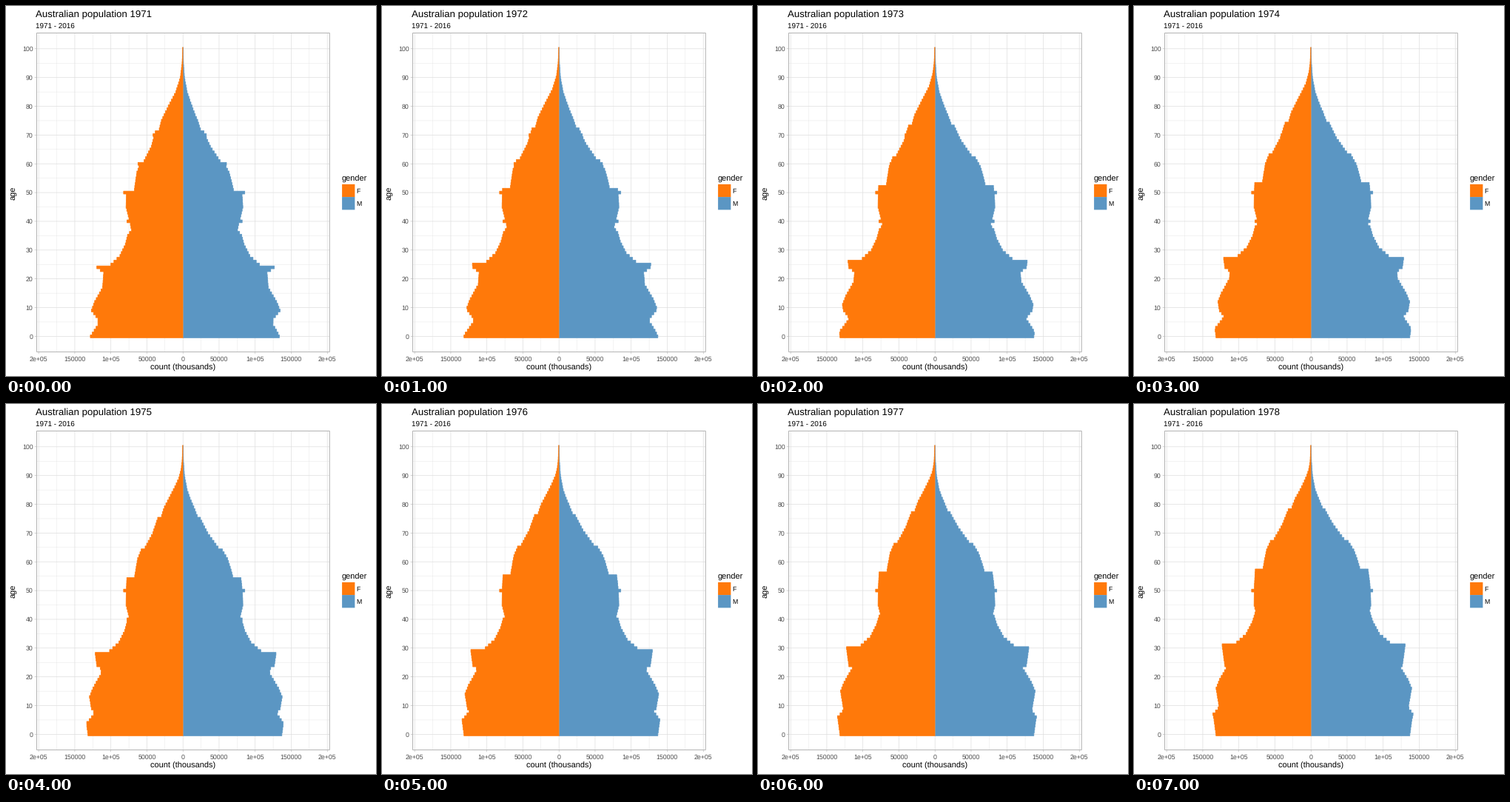
Write a matplotlib script that moves like this. It is 500 px wide and 500 px high and loops after 8 s.

```python
import matplotlib.pyplot as plt
import numpy as np
from matplotlib.animation import FuncAnimation
from matplotlib.patches import Rectangle

plt.rcParams["text.hinting"] = "none"

SIZE, DPI = 500, 100
PX = 72 / DPI                      # points per pixel
X0, PER_K = 239.2, 0.975           # zero line, pixels per thousand people
Y0, PER_AGE = 446.4, 3.886         # age zero, pixels per year of age
LEFT, RIGHT, TOP, BOTTOM = 41.5, 437.3, 36.5, 467.4
ORANGE, BLUE = "#ff790a", "#5b96c3"
GREY, GRID, BORDER = "#4d4d4d", "#dedede", "#b3b3b3"
FIRST_YEAR, YEARS = 1971, 8

AGES = np.arange(101)
BIRTHS = 131.8                     # girls born per year, in thousands

# Turning points of the female age curve: age, thousands
CURVE = [(0, 128.5), (4, 118), (6, 118), (9, 127), (12, 122.5), (17, 111.5),
         (22, 110), (24, 119.5), (25, 100), (28, 87.5), (32, 80), (35, 77),
         (37, 71.5), (39, 73), (45, 79), (50, 78.5), (51, 67.5), (57, 64),
         (60, 59.5), (61, 54), (66, 44), (71, 38.5), (72, 33), (75, 30),
         (80, 20.5), (85, 10), (90, 3.7), (95, 1.3), (100, 0.4)]


def sigmoid(age, middle, width):
    return 1 / (1 + np.exp((middle - age) / width))


def yearly_growth(mortality):
    """Immigration fades after 35, mortality rises exponentially."""
    arrivals = 0.007 * np.exp(-AGES / 3) + 0.005 * sigmoid(-AGES, -36, 4)
    deaths = mortality * np.exp(0.12 * (AGES - 75))
    return 1 + arrivals - np.minimum(deaths, 0.5)


def envelopes(pop, births, mortality):
    """Age every cohort year by year and keep the widest bar seen so far."""
    growth = yearly_growth(mortality)
    rounded = (AGES % 10 == 0) & (AGES >= 40) & (AGES <= 70)
    widest = pop * np.where(rounded, 1.05, 1)   # ages reported as round numbers
    result = [widest]
    for year in range(1, YEARS):
        pop = np.append(0, (pop * growth)[:-1])
        pop[:year] = births * (1 + 0.004 * AGES[:year])
        widest = np.maximum(widest, pop)
        result.append(widest)
    return result


female = np.interp(AGES, *zip(*CURVE))
sex_ratio = 1.06 - 0.02 * np.exp(-AGES / 2) - 0.52 * sigmoid(AGES, 69, 6)
women = envelopes(female, BIRTHS, 0.03)
men = envelopes(female * sex_ratio, BIRTHS * sex_ratio[0], 0.06)

fig = plt.figure(figsize=(SIZE / DPI, SIZE / DPI), dpi=DPI, facecolor="white")
ax = fig.add_axes([0, 0, 1, 1])
ax.set(xlim=(0, SIZE), ylim=(SIZE, 0))
ax.axis("off")


def line(x, y, color, width):
    ax.plot(x, y, color=color, lw=width * PX, zorder=1,
            solid_capstyle="butt", snap=False)


def label(x, y, text, size, color="black", **kw):
    return ax.text(x, y, text, fontsize=size * PX, color=color,
                   family="Liberation Sans", **kw)


def box(x, y, w, h, **kw):
    ax.add_patch(Rectangle((x, y), w, h, snap=False, **kw))


def x_of(thousands):
    return X0 + thousands * PER_K


def y_of(age):
    return Y0 - age * PER_AGE


def count_text(k):
    if k == 0:
        return "0"
    return f"{k // 100}e+05" if k % 100 == 0 else f"{k}000"


# Grid, ticks and tick labels
for k in range(-200, 201, 25):
    x, major = x_of(k), k % 50 == 0
    line([x, x], [TOP, BOTTOM], GRID, 0.7 if major else 0.35)
    if major:
        line([x, x], [BOTTOM, BOTTOM + 2.8], BORDER, 0.6)
        label(x, 479.5, count_text(abs(k)), 8.8, GREY, ha="center")
for age in range(0, 101, 5):
    y, major = y_of(age), age % 10 == 0
    line([LEFT, RIGHT], [y, y], GRID, 0.7 if major else 0.35)
    if major:
        line([LEFT - 2.8, LEFT], [y, y], BORDER, 0.6)
        label(36.5, y + 3.3, str(age), 8.8, GREY, ha="right")
box(LEFT, TOP, RIGHT - LEFT, BOTTOM - TOP, fill=False, ec=BORDER, lw=PX,
    zorder=4)

# Titles and legend
title = label(40.5, 15, "", 13.2)
label(40.5, 31, "1971 - 2016", 9.9)
label(X0, 492, "count (thousands)", 11, ha="center")
label(10.5, 252.4, "age", 11, ha="center", va="center", rotation=90)
label(453.9, 237, "gender", 11)
for top, color, name in ((240.9, ORANGE, "F"), (258.1, BLUE, "M")):
    box(454.1, top, 17.3, 17.3, fc=color, lw=0)
    label(473.4, top + 11.9, name, 8.8)

# Pyramid halves as filled steps with a thin outline
edges = y_of(np.arange(102) - 0.5)
men_half, women_half = [
    ax.stairs(np.full(101, X0), edges, baseline=X0, fill=True, snap=False,
              orientation="horizontal", fc=color, ec=color, lw=0.7 * PX,
              joinstyle="miter", zorder=z)
    for color, z in ((BLUE, 2), (ORANGE, 3))]


def draw(i):
    title.set_text(f"Australian population {FIRST_YEAR + i}")
    men_half.set_data(values=x_of(men[i]), baseline=X0)
    women_half.set_data(values=np.minimum(x_of(-women[i]), X0 - 0.6),
                        baseline=X0 + 0.2)
    return [title, men_half, women_half]


anim = FuncAnimation(fig, draw, frames=YEARS, interval=1000, repeat=True,
                     repeat_delay=0, blit=False)
plt.show()
```
